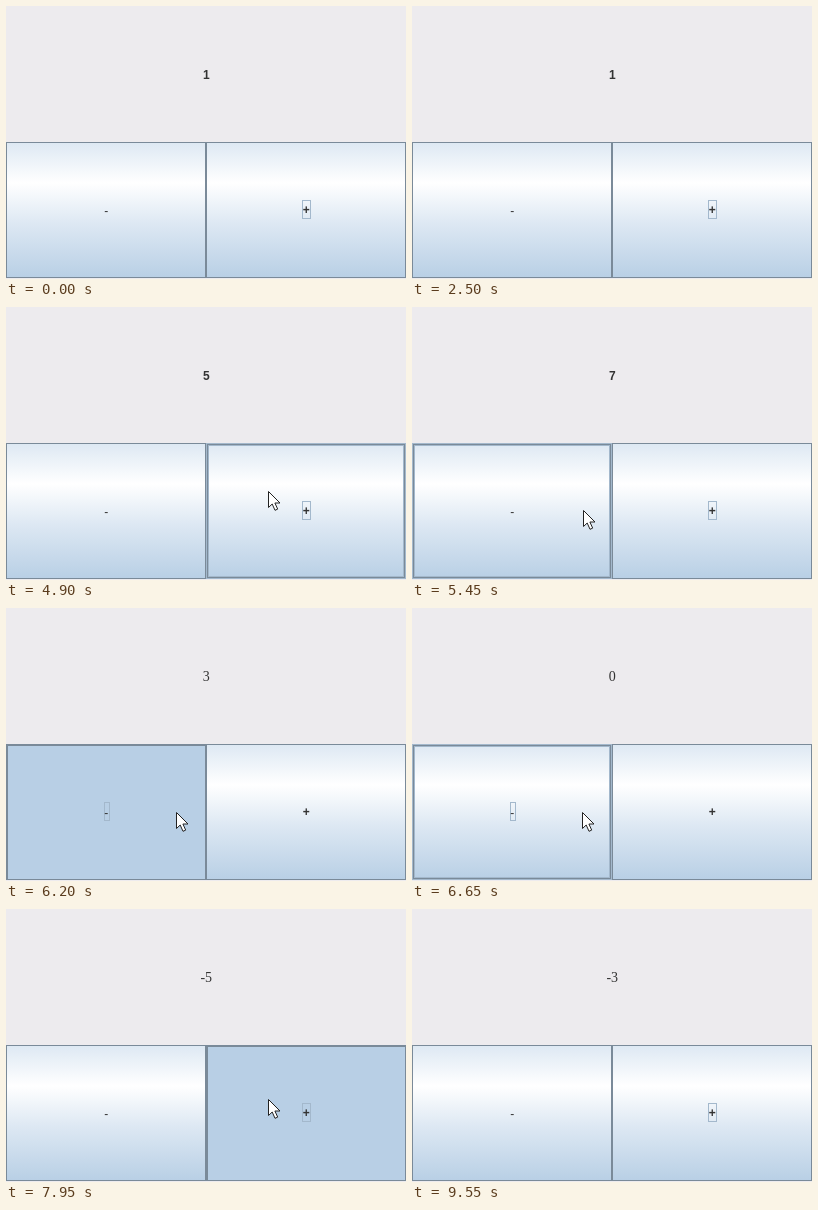
An HTML page that plays this animation: 400 px wide and 273 px high, repeating every 9.9 s.

```html
<!DOCTYPE html>
<html lang="en">
<head>
<meta charset="utf-8">
<title>Counter</title>
<style>
  html, body { margin: 0; width: 100%; height: 100%; overflow: hidden; background: #edebee; }
  svg { display: block; width: 400px; height: 273px; }
  text { text-anchor: middle; fill: #333; font: bold 12px "Liberation Sans", Arial, sans-serif; }
  rect.line { fill: none; shape-rendering: crispEdges; }
</style>
</head>
<body>
<svg id="stage" viewBox="0 0 400 273">
  <defs>
    <linearGradient id="ocean" x1="0" y1="0" x2="0" y2="1">
      <stop offset="0" stop-color="#dde8f3"/>
      <stop offset=".3" stop-color="#fff"/>
      <stop offset=".6" stop-color="#dde8f3"/>
      <stop offset="1" stop-color="#b8cfe5"/>
    </linearGradient>
  </defs>
  <rect width="400" height="273" fill="#edebee"/>
  <text id="count" x="200.3" y="73"></text>
  <g id="buttons"></g>
  <path id="cursor" d="M.5 .5V16.5L4.2 13L7 19.3L9.7 18.1L6.9 12H12Z" fill="#fff" stroke="#222" stroke-width="1"/>
</svg>
<script>
const LOOP = 9900, TICK = 50;
const SHADOW = '#7a8a99', SOFT = '#a3b8cc', PRESSED = '#b8cfe5';
const snap = t => Math.round(t / TICK) * TICK;
const series = (start, period, n) => Array.from({ length: n }, (_, i) => snap(start + i * period));

const press = (side, step, hold = 50) => t => ({ side, step, down: t, up: t + hold });
const clicks = [
  ...series(4500, 120, 6).map(press(1, 1)),
  ...series(5600, 150, 5).map(press(0, -1)),
  ...series(6200 + 950 / 6, 950 / 6, 5).map(press(0, -1)),
  ...[7150, 7300, 7450].map(press(0, -1, 100)),
  ...[7800, 7950].map(press(1, 1)),
  press(1, 1, 100)(8150)
];

// Pointer visits as [time, x, y]; the pointer is hidden outside them.
const visits = [
  { hover: false, keys: [[700, 250, 27], [1100, 215, 75], [1300, 169, 90], [1600, 324, 110],
    [1850, 200, 130], [2150, 254, 157], [2250, 250, 173], [2500, 250, 173]] },
  { hover: true, keys: [[3300, 375, 255], [3450, 310, 205], [3700, 310, 205], [3850, 120, 215],
    [4000, 120, 215], [4300, 262, 184], [5200, 262, 184], [5450, 171, 203], [5500, 171, 203],
    [5600, 170, 204], [7500, 170, 204], [7750, 262, 190], [8500, 262, 190], [8900, 400, 262]] }
];

const svgNode = (name, attrs, parent) => {
  const node = document.createElementNS('http://www.w3.org/2000/svg', name);
  setAttrs(node, attrs);
  return parent.appendChild(node);
};
function setAttrs(node, attrs) {
  for (const key in attrs) node.setAttribute(key, attrs[key]);
}
const show = (node, on) => node.setAttribute('visibility', on ? 'visible' : 'hidden');
const byId = id => document.getElementById(id);

function makeButton(x, label, focusWidth) {
  const group = svgNode('g', { transform: `translate(${x} 136)` }, byId('buttons'));
  const frame = inset => svgNode('rect', {
    class: 'line', x: inset + .5, y: inset + .5, width: 199 - 2 * inset, height: 135 - 2 * inset
  }, group);
  const face = svgNode('rect', { width: 200, height: 136 }, group);
  const frames = [0, 1, 2].map(frame);
  const sunken = svgNode('path', { d: 'M0 0H200V2H2V136H0Z', fill: SHADOW }, group);
  const focus = svgNode('rect', {
    class: 'line', x: 100.5 - focusWidth / 2, y: 58.5, width: focusWidth, height: 18, stroke: SOFT
  }, group);
  const text = svgNode('text', { x: 100.3, y: label === '-' ? 73 : 72 }, group);
  text.textContent = label;
  if (label === '-') text.style.fontWeight = 'normal';

  return ({ hover, down, focused }) => {
    const raised = hover && !down;
    face.setAttribute('fill', down ? PRESSED : 'url(#ocean)');
    frames[0].setAttribute('stroke', raised ? SOFT : SHADOW);
    frames[1].setAttribute('stroke', SHADOW);
    frames[2].setAttribute('stroke', SOFT);
    show(frames[1], raised);
    show(frames[2], raised);
    show(sunken, down);
    show(focus, focused);
  };
}

const buttons = [makeButton(0, '-', 5), makeButton(200, '+', 8)];

function pointerAt(t) {
  const visit = visits.find(({ keys }) => t >= keys[0][0] && t < keys[keys.length - 1][0]);
  if (!visit) return null;
  const i = visit.keys.findIndex(key => key[0] > t);
  const [t0, x0, y0] = visit.keys[i - 1], [t1, x1, y1] = visit.keys[i];
  const k = (t - t0) / (t1 - t0);
  return { x: Math.round(x0 + (x1 - x0) * k), y: Math.round(y0 + (y1 - y0) * k), hover: visit.hover };
}

function render(time) {
  const t = Math.floor(time % LOOP / TICK) * TICK;
  const started = clicks.filter(c => c.down <= t);
  const last = started[started.length - 1];
  const value = started.reduce((sum, c) => c.up <= t ? sum + c.step : sum, 1);
  const focusSide = last ? last.side : 1;
  const pointer = pointerAt(t);

  const count = byId('count');
  count.textContent = value;
  count.style.font = t < 5600 ? '' : '14px "Liberation Serif", Times, serif';

  buttons.forEach((update, side) => update({
    hover: !!pointer && pointer.hover && pointer.y >= 136 && (pointer.x >= 200) === (side === 1),
    down: !!last && last.side === side && t < last.up,
    focused: focusSide === side
  }));

  show(byId('cursor'), !!pointer);
  if (pointer) byId('cursor').setAttribute('transform', `translate(${pointer.x} ${pointer.y})`);
}

const start = performance.now();
function loop() {
  render(performance.now() - start);
  requestAnimationFrame(loop);
}
loop();
</script>
</body>
</html>
```
